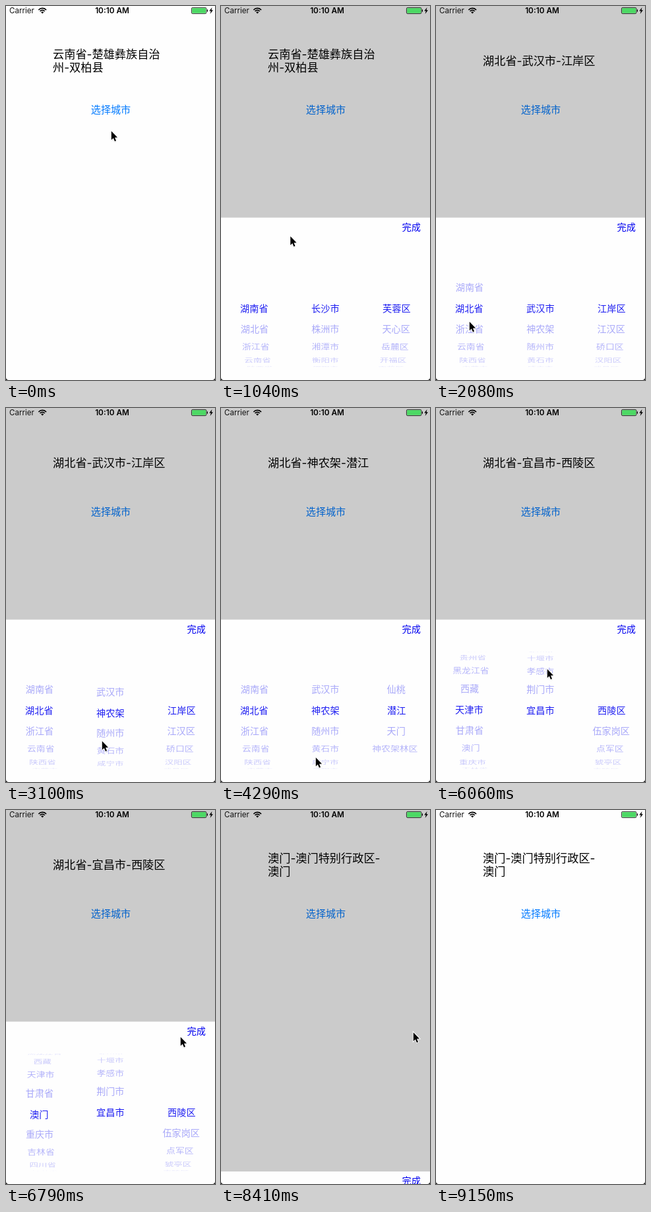
Recreate the animation shown at these times as an HTML page with a canvas. Size 317 px wide and 565 px high, loop 9.92 s.

```html
<!DOCTYPE html>
<html lang="zh-CN">
<head>
<meta charset="utf-8">
<title>选择城市</title>
<style>
html, body { margin: 0; width: 100%; height: 100%; overflow: hidden; background: #fefefe; }
canvas { display: block; width: 317px; height: 565px; }
</style>
</head>
<body>
<canvas id="stage"></canvas>
<script>
const W = 317, H = 565, LOOP = 9920, START = 450, TICK = 147.45;
const OPEN = 0, CLOSE = 54, END = 59;
const FONT = 'Inter, "Noto Sans CJK SC", "Noto Sans CJK", sans-serif';
const PAPER = '#fefefe', BLUE = '#0000f0';
const canvas = document.getElementById('stage');
const c = canvas.getContext('2d');
const dpr = window.devicePixelRatio || 1;
canvas.width = W * dpr;
canvas.height = H * dpr;

const list = s => s.split(' ');
const provinces = list('湖南省 湖北省 浙江省 云南省 陕西省 内蒙古 贵州省 黑龙江省 西藏 天津市 甘肃省 澳门 重庆市 吉林省 四川省 江苏省');
const hunan = list('长沙市 株洲市 湘潭市 衡阳市 邵阳市');
const hubei = list('武汉市 神农架 随州市 黄石市 咸宁市 襄阳市 荆州市 恩施州 黄冈市 鄂州市 十堰市 孝感市 荆门市 宜昌市');
const changsha = list('芙蓉区 天心区 岳麓区 开福区 雨花区');
const wuhan = list('江岸区 江汉区 硚口区 汉阳区 武昌区');
const shennongjia = list('仙桃 潜江 天门 神农架林区');
const yichang = list('西陵区 伍家岗区 点军区 猇亭区 夷陵区');

// From each tick on: cities, districts, label lines
const scenes = [
  [-1, hunan, changsha, ['云南省-楚雄彝族自治', '州-双柏县']],
  [11, hubei, wuhan, ['湖北省-武汉市-江岸区']],
  [20, hubei, shennongjia, ['湖北省-神农架-仙桃']],
  [24, hubei, shennongjia, ['湖北省-神农架-潜江']],
  [37, hubei, yichang, ['湖北省-宜昌市-西陵区']],
  [45, ['澳门特别行政区'], ['澳门'], ['澳门-澳门特别行政区-', '澳门']]
];

// Flicks per wheel: from tick, to tick, rows
const flicks = [
  [[7, 10, 1], [29, 36.5, 7], [36.5, 44.3, 3]],
  [[16, 19, 1], [26, 33, 11], [33, 36, 1]],
  [[21, 24, 1], [36, 37, -1]]
];

// Cursor stops: tick, x, y
const stops = [
  [1, 159, 189], [7, 50, 507], [11, 50, 477], [15, 145, 528], [19, 145, 495], [21, 262, 500], [24, 272, 465],
  [26, 143, 528], [29, 150, 450], [33, 72, 446], [43, 264, 343], [47, 291, 336], [CLOSE, 291, 336], [END, 235, 590]
];

const clamp = (v, lo, hi) => Math.max(lo, Math.min(hi, v));
const easeOut = u => 1 - (1 - u) ** 2;

function wheelPos(i, k) {
  return flicks[i].reduce((sum, [from, to, rows]) =>
    sum + rows * easeOut(clamp((k - from) / (to - from), 0, 1)), 0);
}

function cursorPos(k) {
  const i = clamp(stops.findIndex(s => s[0] >= k), 1, stops.length - 1);
  const [t0, x0, y0] = stops[i - 1], [t1, x1, y1] = stops[i];
  const u = clamp((k - t0) / (t1 - t0), 0, 1);
  return [x0 + (x1 - x0) * u, y0 + (y1 - y0) * u];
}

function text(s, x, mid, size, color, align = 'left') {
  c.font = `${size}px ${FONT}`;
  c.fillStyle = color;
  c.textAlign = align;
  c.fillText(s, x, mid + size * .37);
}

function clipped(y, h, draw) {
  c.save();
  c.beginPath();
  c.rect(0, y, W, h);
  c.clip();
  draw();
  c.restore();
}

function poly(points, color) {
  c.beginPath();
  points.forEach(p => c.lineTo(p[0], p[1]));
  c.closePath();
  c.fillStyle = color;
  c.fill();
}

// One wheel column on a cylinder seen in slight perspective
function wheel(rows, pos, x, mid, flat) {
  rows.forEach((name, i) => {
    const a = (i - pos) * Math.PI / 10;
    if (Math.abs(a) > 1.5) return;
    const s = 1 / (1 + .123 * (1 - Math.cos(a)));
    c.save();
    c.translate(W / 2 + (x - W / 2) * s, mid + 102 * Math.sin(a) * s);
    c.globalAlpha = flat ? .88 : .36 * Math.cos(a);
    if (!flat) c.scale(s, s * Math.cos(a));
    text(name, 0, 0, 14.2, BLUE, 'center');
    c.restore();
  });
}

function drawPanel(top, k, columns) {
  c.fillStyle = PAPER;
  c.fillRect(0, top, W, H - top);
  text('完成', 303, top + 13.6, 14.2, BLUE, 'right');
  const mid = top + 137;
  const wheels = flat => columns.forEach((rows, i) =>
    wheel(rows, Math.min(wheelPos(i, k), rows.length - 1), 50.3 + 108 * i, mid, flat));
  clipped(mid - 88.5, 73, () => wheels(false));
  clipped(mid - 15.5, 31, () => wheels(true));
  clipped(mid + 15.5, 73, () => wheels(false));
}

function drawStatus() {
  text('Carrier', 5, 7, 11.6, '#111');
  c.fillStyle = '#000';
  c.font = `600 11.8px ${FONT}`;
  c.textAlign = 'center';
  c.fillText('10:10 AM', 161, 11.3);
  c.strokeStyle = '#000';
  c.lineWidth = 1.6;
  for (const r of [5, 8]) {
    c.beginPath();
    c.arc(55.2, 11.4, r, -Math.PI * .76, -Math.PI * .24);
    c.stroke();
  }
  c.beginPath();
  c.moveTo(55.2, 11.4);
  c.arc(55.2, 11.4, 2.8, -Math.PI * .76, -Math.PI * .24);
  c.fill();
  c.lineWidth = .8;
  c.beginPath();
  c.roundRect(281.4, 2.4, 22.6, 9.2, 1.8);
  c.stroke();
  c.fillRect(304.8, 5.4, 1.2, 3.2);
  c.fillStyle = '#4cd964';
  c.fillRect(282.2, 3.2, 21, 7.6);
  poly([[312.6, 2], [308.3, 7.6], [310.8, 7.6], [309.6, 12], [314, 6.2], [311.5, 6.2]], '#000');
}

function drawCursor(x, y) {
  c.save();
  c.translate(x + .8, y);
  c.shadowColor = 'rgba(0,0,0,.35)';
  c.shadowBlur = 2;
  c.shadowOffsetY = 1;
  const arrow = [[0, 0], [0, 13.2], [3, 10.6], [5.2, 15.4], [7.2, 14.5], [5.2, 9.8], [9.2, 9.5]];
  poly(arrow, '#000');
  c.shadowColor = 'transparent';
  c.strokeStyle = '#fff';
  c.lineWidth = 2;
  c.stroke();
  poly(arrow, '#000');
  c.restore();
}

function drawCorners() {
  c.fillStyle = '#000';
  for (const [x, d] of [[0, 1], [W, -1]]) {
    c.beginPath();
    c.moveTo(x, H);
    c.lineTo(x, H - 4);
    c.quadraticCurveTo(x, H, x + 4 * d, H);
    c.fill();
  }
}

function draw(t) {
  const k = t < START ? -1 : Math.min(END, Math.floor((t - START + 12) / TICK));
  const [, cities, districts, lines] = scenes.filter(s => s[0] <= k).pop();
  c.setTransform(dpr, 0, 0, dpr, 0, 0);
  c.fillStyle = PAPER;
  c.fillRect(0, 0, W, H);
  lines.forEach((s, i) => text(s, 71, 83 - 10 * (lines.length - 1) + 20 * i, 17.2, '#000'));
  text('选择城市', 159, 156, 15.1, '#007aff', 'center');
  if (k >= OPEN && k <= CLOSE) {
    c.fillStyle = 'rgba(0,0,0,.2)';
    c.fillRect(0, 0, W, H);
    const hidden = k === OPEN ? .5 : k === CLOSE ? .924 : 0;
    drawPanel(319.7 + 245 * hidden, k, [provinces, cities, districts]);
  }
  drawStatus();
  if (k < END) drawCursor(...cursorPos(k));
  drawCorners();
}

function loop() {
  draw(performance.now() % LOOP);
  requestAnimationFrame(loop);
}
loop();
</script>
</body>
</html>
```
